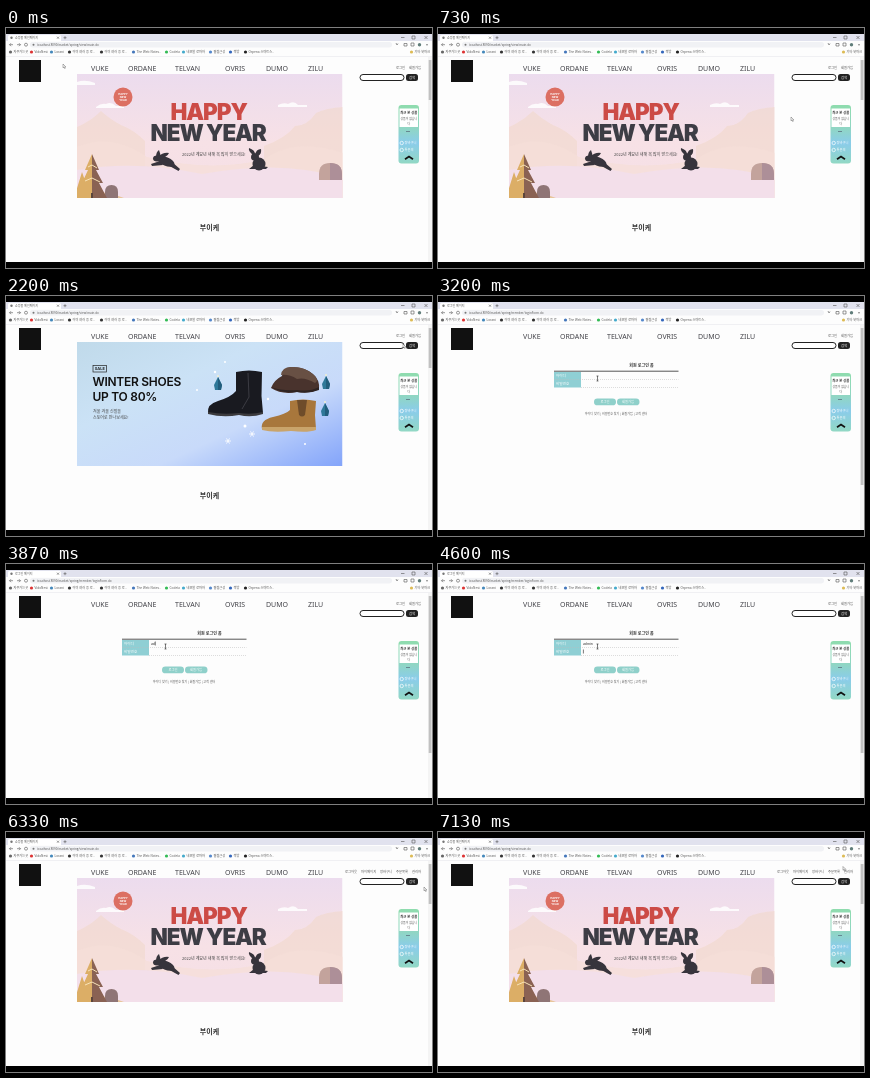
An HTML page for the animation above (7.19 s loop, 426 by 240 pixels).

```html
<!DOCTYPE html>
<html lang="ko">
<head>
<meta charset="utf-8">
<title>쇼핑몰</title>
<style>
html, body { margin: 0; width: 100%; height: 100%; overflow: hidden; background: #000 }
svg { display: block; width: 100vw; height: 100vh }
text { font-family: "Noto Sans CJK KR", "Noto Sans CJK", "Noto Sans", sans-serif; font-size: 3.3px; fill: #555; white-space: pre }
.mid { text-anchor: middle }
.nav text { font: 500 7px "Noto Sans", sans-serif; fill: #44444a }
.hero { font: 900 22.5px Inter, sans-serif; letter-spacing: -1.1px; font-kerning: none }
.winter { font: 600 12px Inter, sans-serif; letter-spacing: -.27px; fill: #111 }
.white { fill: #fff }
.bold { font-weight: 700; fill: #333 }
</style>
</head>
<body>
<svg viewBox="0 0 426 240">
<defs>
  <linearGradient id="dawn" x2="0" y2="1">
    <stop stop-color="#ecdcee"/><stop offset=".55" stop-color="#f7e1e6"/><stop offset="1" stop-color="#f5dfe6"/>
  </linearGradient>
  <linearGradient id="ice" x2="1" y2="1">
    <stop stop-color="#c0daea"/><stop offset=".35" stop-color="#cbe2f6"/>
    <stop offset=".65" stop-color="#c8dafa"/><stop offset="1" stop-color="#83a4fa"/>
  </linearGradient>
  <linearGradient id="mint" x2="0" y2="1">
    <stop stop-color="#8fdcae"/><stop offset=".4" stop-color="#90d6c4"/>
    <stop offset=".65" stop-color="#8accea"/><stop offset="1" stop-color="#92d8c4"/>
  </linearGradient>
  <clipPath id="frame"><path d="M71 46h265.500v124H71z"/></clipPath>
  <g id="fir">
    <path d="M0-6L-4 2-3 7H3L4 2z" fill="#2f7899"/>
    <path d="M0-6L4 2 3 7H0z" fill="#225d7c"/>
    <circle cy="-7" r="1" fill="#f3efd0"/>
  </g>
  <path id="flake" d="M-3 0H3M-1.500-2.600L1.500 2.600M1.500-2.600L-1.500 2.600" stroke="#fff" stroke-width=".8"/>
</defs>

<path d="M0 6h426v228H0z" fill="#fdfdfd"/>

<!-- browser window -->
<path d="M0 6h426v7H0z" fill="#e1e2ee"/>
<path d="M2 13V8.500q0-1.500 1.500-1.500h50q1.500 0 1.500 1.500V13z" fill="#fff"/>
<circle cx="5.500" cy="9.700" r="1.200" fill="#777"/>
<text id="tab" x="9" y="10.800" style="font-size:3px"></text>
<g fill="none" stroke="#555" stroke-width=".6">
  <path d="M51 8.700l2 2m0-2l-2 2M57.500 9.700h3m-1.500-1.500v3M395 9.500h3.500M406 8h3v3h-3zM418.500 8l3 3m0-3l-3 3"/>
  <path d="M7 16.700H3.500l1.500-1.500m-1.500 1.500L5 18.200M11 16.700h3.500l-1.500-1.500m1.500 1.500L13 18.200"/>
  <circle cx="20" cy="16.700" r="1.500"/>
  <path d="M390 15l1 2 1-1.500M398 15.500h3v2.500h-3zM405 15h3v3h-3z"/>
</g>
<rect x="24" y="14" width="362" height="5.500" rx="2.700" fill="#f1f2f5"/>
<circle cx="27.500" cy="16.700" r="1" fill="#777"/>
<text id="url" x="31" y="17.800" style="font-size:3px"></text>
<circle cx="413.500" cy="16.700" r="1.700" fill="#607d7a"/>
<circle cx="421" cy="16.700" r=".7" fill="#555"/>
<g id="bookmarks"></g>
<path d="M0 28.500h426" stroke="#e8e8ec" stroke-width=".6"/>
<path d="M422 29H426V234h-4z" fill="#f4f4f4"/>
<rect id="thumb" x="422.700" y="32" width="2.800" fill="#c1c1c1"/>

<!-- shop header -->
<rect x="13" y="32" width="22" height="22" fill="#111"/>
<g class="nav">
  <text x="85" y="42.500">VUKE</text><text x="122" y="42.500">ORDANE</text>
  <text x="169" y="42.500">TELVAN</text><text x="219" y="42.500">OVRIS</text>
  <text x="260" y="42.500">DUMO</text><text x="302" y="42.500">ZILU</text>
</g>
<g id="guest"><text x="390" y="40.700">로그인</text><text x="403" y="40.700">회원가입</text></g>
<g id="member">
  <text x="339" y="40.700">로그아웃</text><text x="355" y="40.700">마이페이지</text>
  <text x="374" y="40.700">장바구니</text><text x="390" y="40.700">주문목록</text><text x="406" y="40.700">관리자</text>
</g>
<rect x="354" y="46.500" width="44" height="6" rx="3" fill="#fff" stroke="#222"/>
<rect x="400" y="46" width="12" height="7" rx="2.500" fill="#222"/>
<text class="mid white" x="406" y="50.800">검색</text>

<!-- main page -->
<g id="home">
  <g clip-path="url(#frame)"><g id="slides">
    <g>
      <path d="M71 46h265.500v124H71z" fill="url(#dawn)"/>
      <path d="M71 99q14-6 24-16 10 9 20 14 13 5 24 16v57H71zM258 118q22-8 31-20 12 0 21-13 10-5 27-6v91h-79z" fill="#f2d9cb" opacity=".6"/>
      <path d="M71 119q34-15 70 10 65 16 118 2 30-22 78-6v45H71z" fill="#f6dfd8" opacity=".75"/>
      <path d="M71 142q60-10 125 4 80-15 141 4v20H71z" fill="#f3dfea"/>
      <g fill="#fff" opacity=".85">
        <path d="M90 79q5-4 10-3 5-3 10 2h8v2H90zM272 77q6-3 10-1 6-4 10 1h9v2h-29zM71 54q8-3 18 1v2H71z"/>
      </g>
      <circle cx="117" cy="69" r="9.500" fill="#dc6f62"/>
      <text class="mid white" style="font:700 2.700px Inter,sans-serif"><tspan x="117" y="67">HAPPY</tspan><tspan x="117" y="70">NEW</tspan><tspan x="117" y="73">YEAR</tspan></text>
      <text class="hero" x="164.500" y="91.800" style="fill:#cc4b46">HAPPY</text>
      <text class="hero" x="144.500" y="112.800" style="fill:#3d3d45">NEW YEAR</text>
      <text x="176" y="127.500" style="font-size:4px;fill:#444">2022년 계묘년 새해 복 많이 받으세요!</text>
      <g fill="#37343c">
        <ellipse cx="160" cy="133.500" rx="9" ry="4.300" transform="rotate(22 160 133.500)"/>
        <ellipse cx="151" cy="130.500" rx="4" ry="3"/>
        <path d="M150 129q0-5 3-7 2 4 1 8zM152 129q5-5 11-4-2 4-9 6zM166 134l8 7-1.500 2-9-5zM154 133l-9 3 1 2 11-1z"/>
        <ellipse cx="253" cy="136" rx="6.500" ry="6.500"/>
        <ellipse cx="249" cy="129" rx="4" ry="3.800"/>
        <path d="M247 127q-5-4-4-7 6 2 6 6zM249 127q1-6 6-6 1 5-3 7zM248 137l-5 4h17l2-2z"/>
      </g>
      <path d="M313 152v-6q0-11 11-11 12 0 12 11v6z" fill="#c3a39c"/>
      <path d="M324 135q12 0 12 11v6h-12z" fill="#ad8f98"/>
      <path d="M71 170v-4q22-6 47 4z" fill="#e8c59a"/>
      <path d="M99 170v-6q0-7 6.500-7t6.500 7v6z" fill="#8f7576"/>
      <path d="M76 144l-8 26h17zM86 126l-7 16h3l-6 13h4l-7 15h13z" fill="#dcae66"/>
      <path d="M86 126l7 16h-3l7 13h-4l8 15H86z" fill="#8a6253"/>
      <path d="M82 139l4-2 5 3M79 153l7-3 8 4" fill="none" stroke="#f8e3b8" stroke-width="1"/>
      <path d="M85 165h2v5h-2z" fill="#5b453c"/>
    </g>
    <g transform="translate(265.500)">
      <path d="M71 46h265.500v124H71z" fill="url(#ice)"/>
      <rect x="87" y="69.500" width="13.500" height="6.500" fill="none" stroke="#222" stroke-width=".7"/>
      <text class="mid" x="93.800" y="74.400" style="font:600 4px Inter,sans-serif;fill:#111">SALE</text>
      <text class="winter" x="86.500" y="90">WINTER SHOES</text>
      <text class="winter" x="86.500" y="104.500">UP TO 80%</text>
      <text x="87" y="117.300" style="font-size:4px;fill:#444">겨울 겨울 신발을</text>
      <text x="87" y="123" style="font-size:4px;fill:#444">스토어로 만나보세요!</text>
      <use href="#fir" x="212" y="87"/><use href="#fir" x="320" y="86"/><use href="#fir" x="319" y="113"/>
      <use href="#flake" x="246" y="138"/><use href="#flake" x="222" y="145"/>
      <g fill="#fff">
        <circle cx="209" cy="76" r="1.200"/><circle cx="191" cy="94" r="1"/><circle cx="219" cy="66" r="1"/>
        <circle cx="262" cy="103" r="1.200"/><circle cx="239" cy="130" r="1.500"/><circle cx="299" cy="148" r="1"/>
      </g>
      <path d="M230 76q13-3 26 0l-.5 24 1.500 17q-12 4-24 1-16 3-31-1-1-9 10-12 13-4 18-10z" fill="#191a20"/>
      <path d="M202 116q15 3 31 1 12 2 24-1v2q-12 4-24 1-16 3-31-1z" fill="#3b3a3d"/>
      <path d="M242 77l1 24-7 12" fill="none" stroke="#45454c" stroke-width=".8"/>
      <path d="M265 92q3-8 11-12 0-8 9-9 14 0 22 7 7 6 6 15-8 5-22 3-15 3-26-4z" fill="#49332d"/>
      <path d="M275 79q1-8 10-8 14-1 24 9 4 5 0 7-10-6-18-4-8-5-16-4z" fill="#685044"/>
      <path d="M265 91q11 4 26 3 13 2 22-3v3q-10 4-22 2-15 2-26-5z" fill="#2e2423"/>
      <path d="M284 105q13-3 26 0l-1 14 1 14h-54q-2-9 11-12 13-3 17-7z" fill="#a8773c"/>
      <path d="M291 104h10l-2 15q-3 3-6 0z" fill="#6e4c2a"/>
      <path d="M256 131h54v3q-8 3-25 1-18 2-29-1z" fill="#c9a46b"/>
    </g>
  </g></g>
  <text class="mid bold" x="203.500" y="201.500" style="font-size:7px">부이케</text>
</g>

<!-- login page -->
<g id="login">
  <text class="mid bold" x="203.500" y="70.500" style="font-size:4px">회원 로그인 폼</text>
  <path d="M116 75.200h124.500" stroke="#555" stroke-width="1"/>
  <path d="M116 76h27v15.500h-27z" fill="#8fcfd4"/>
  <path d="M116 83.500h124.500M143 91.500h97" stroke="#bbb" stroke-width=".5" stroke-dasharray="1 1"/>
  <text class="white" x="118" y="81" style="font-size:3.600px">아이디</text>
  <text class="white" x="118" y="88.800" style="font-size:3.600px">비밀번호</text>
  <text id="user" x="145" y="80.700" style="fill:#222"></text>
  <text id="pass" x="145" y="88.700" style="fill:#222"></text>
  <path id="caret" stroke="#222" stroke-width=".6"/>
  <rect x="156" y="102.500" width="22" height="6.800" rx="3.400" fill="#8fd0ca"/>
  <rect x="179" y="102.500" width="22.500" height="6.800" rx="3.400" fill="#8fd0ca"/>
  <text class="mid white" x="167" y="107.100">로그인</text>
  <text class="mid white" x="190" y="107.100">회원가입</text>
  <text class="mid" x="178" y="118.800" style="font-size:3px">아이디 찾기 | 비밀번호 찾기 | 회원가입 | 고객 센터</text>
</g>

<!-- floating side box -->
<rect x="392.500" y="77" width="20.500" height="58.500" rx="3" fill="url(#mint)"/>
<path d="M393.500 80.500h18.500v18.500h-18.500z" fill="#fff"/>
<text class="mid bold" x="402.800" y="85.500">최근 본 상품</text>
<text class="mid" x="402.800" y="91.500" style="font-size:2.900px">상품이 없습니</text>
<text class="mid" x="402.800" y="96.500" style="font-size:2.900px">다</text>
<path d="M400 103.500h4" stroke="#567" stroke-width=".7"/>
<g fill="none" stroke="#fff" stroke-width=".7">
  <circle cx="395.700" cy="115" r="1.700"/><circle cx="395.700" cy="122" r="1.700"/>
</g>
<text class="white" x="398.500" y="116.200">장바구니</text>
<text class="white" x="398.500" y="123.200">톡문의</text>
<path d="M399 131.300l4-2.800 4 2.800" fill="none" stroke="#111" stroke-width="1.700"/>

<path id="arrow" d="M0 0v3.800l.9-.8.7 1.500.7-.3-.7-1.400h1.200z" fill="#fff" stroke="#444" stroke-width=".4"/>
<path id="beam" d="M-1-2.500h2M0-2.500v5M-1 2.500h2" fill="none" stroke="#222" stroke-width=".6"/>
</svg>
<script>
const LOOP = 7190;
const $ = id => document.getElementById(id);
const show = (id, on) => $(id).style.display = on ? "" : "none";
const clamp = v => Math.max(0, Math.min(1, v));
const ease = v => v * v * (3 - 2 * v);

// x, label, icon colour
const bookmarks = [
  [3, "자주가는곳", "#666"], [24, "VidoNest", "#d33"], [44, "Lorani", "#48b"],
  [62, "이미 여러 종 로..", "#333"], [94, "이미 여러 종 로..", "#333"], [126, "The Web Notes..", "#47b"],
  [159, "Codela", "#3b5"], [176, "네모말 로마자", "#4ac"], [203, "웹접근성", "#58c"],
  [223, "책방", "#36b"], [238, "Orpena 스마트스..", "#222"], [404, "기타 북마크", "#db5"]
];
$("bookmarks").innerHTML = bookmarks.map(([x, label, color]) =>
  `<circle cx="${x + 1.5}" cy="24" r="1.600" fill="${color}"/>
   <text x="${x + 4.5}" y="25.200" style="font-size:3.200px">${label}</text>`).join("");

// time, x, y of the pointer
const path = [
  [0, 57, 36], [130, 60, 40], [730, 353, 89], [1500, 355, 88], [2200, 397, 48],
  [2500, 395, 38], [2700, 395, 38], [3100, 159.5, 82.5], [5650, 159.5, 82.5],
  [6330, 418, 55], [6700, 417, 52], [7130, 405, 34.5]
];

function pointer(t) {
  const i = path.findIndex(p => p[0] > t);
  if (i < 0) return path[path.length - 1].slice(1);
  const [t0, x0, y0] = path[i - 1], [t1, x1, y1] = path[i];
  const k = ease((t - t0) / (t1 - t0));
  return [x0 + (x1 - x0) * k, y0 + (y1 - y0) * k];
}

const typed = (word, t, start, gap) => word.slice(0, Math.max(0, Math.floor((t - start) / gap)));

function draw(now) {
  const t = Math.floor((now % LOOP) * .015 + .1) / .015;
  const login = t >= 2700 && t < 5700, member = t >= 5700;
  show("home", !login);
  show("login", login);
  show("guest", !member);
  show("member", member);
  $("tab").textContent = login ? "로그인 페이지" : "쇼핑몰 메인페이지";
  $("url").textContent = "localhost:8090/market/spring/" + (login ? "member/loginForm.do" : "view/main.do");
  $("thumb").setAttribute("height", login ? 157 : 40);

  const slide = member ? 0 : ease(clamp((t - 1400) / 300));
  $("slides").setAttribute("transform", `translate(${-265.5 * slide})`);

  $("user").textContent = typed("admin", t, 3500, 130);
  $("pass").textContent = typed("•••••", t, 4650, 130);
  const onPass = t >= 4400;
  const caretX = 145 + (onPass ? $("pass") : $("user")).getComputedTextLength();
  $("caret").setAttribute("d", `M${caretX + .4} ${onPass ? 85.5 : 77.5}v4`);
  show("caret", t >= 3400);

  const [x, y] = pointer(t), text = login && t >= 3000;
  show("arrow", !text);
  show("beam", text);
  $(text ? "beam" : "arrow").setAttribute("transform", `translate(${x} ${y})`);
}

const start = performance.now();
function tick() {
  draw(performance.now() - start);
  requestAnimationFrame(tick);
}
tick();
</script>
</body>
</html>
```
